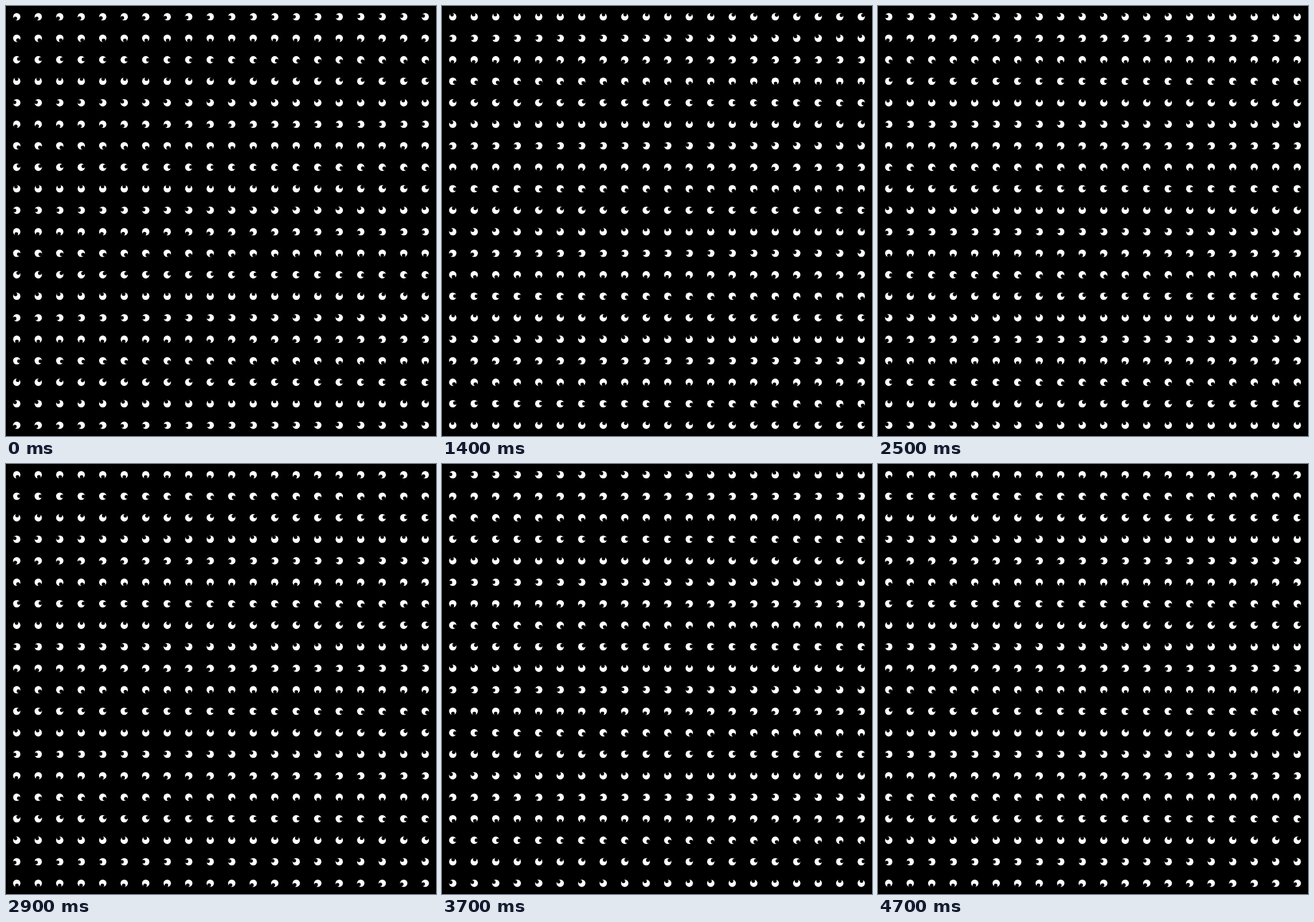
An HTML page with a canvas that plays this animation: 748 px wide and 748 px high, repeating every 4800 ms.

```html
<!DOCTYPE html>
<html lang="en">
<head>
<meta charset="utf-8">
<title>Rolling eyes</title>
<style>
  html, body { margin: 0; width: 100%; height: 100%; overflow: hidden; background: #000; }
  canvas { display: block; }
</style>
</head>
<body>
<canvas id="stage" width="748" height="748"></canvas>
<script>
const ctx = document.getElementById('stage').getContext('2d');
const COUNT = 20, PITCH = 748 / COUNT;
const EYE = 6.4, PUPIL = 3.1, REACH = 3.9;
const STEP_MS = 100, STEPS = 6;
const START = 130, LAG = 3.75; // degrees

function disc(x, y, r, color) {
  ctx.fillStyle = color;
  ctx.beginPath();
  ctx.arc(x, y, r, 0, Math.PI * 2);
  ctx.fill();
}

function draw(step) {
  ctx.fillStyle = '#000';
  ctx.fillRect(0, 0, 748, 748);
  for (let row = 0; row < COUNT; row++) {
    for (let col = 0; col < COUNT; col++) {
      const x = (col + 0.5) * PITCH, y = (row + 0.5) * PITCH;
      const degrees = START + LAG * (col - COUNT * row) + step * 360 / STEPS;
      const angle = degrees * Math.PI / 180;
      disc(x, y, EYE, '#fff');
      disc(x + REACH * Math.cos(angle), y + REACH * Math.sin(angle), PUPIL, '#000');
    }
  }
}

const begin = performance.now();
function tick() {
  draw(Math.floor((performance.now() - begin) / STEP_MS) % STEPS);
  requestAnimationFrame(tick);
}
tick();
</script>
</body>
</html>
```
